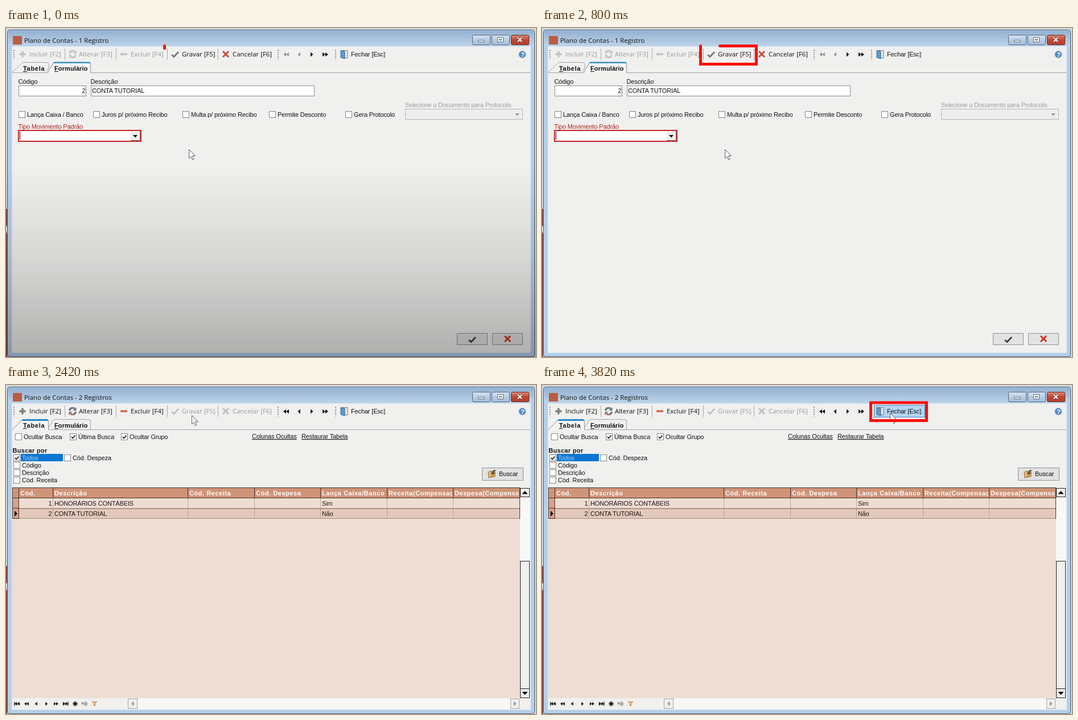
An HTML page for the animation above (4090 ms loop, 931 by 578 pixels).

```html
<!DOCTYPE html>
<html lang="pt">
<head>
<meta charset="utf-8">
<title>Plano de Contas</title>
<style>
  html, body { margin: 0; width: 100%; height: 100%; overflow: hidden; background: #d3d9df; }
  svg { display: block; }
  text { font: 11px "Liberation Sans", Arial, sans-serif; letter-spacing: -.14px; fill: currentColor; white-space: pre; }
  .ui text, text.ui { font: 11.4px "Open Sans", "Noto Sans", sans-serif; letter-spacing: 0; }
  .b { font-weight: bold; letter-spacing: .1px; }
  .head text { font-weight: bold; letter-spacing: .55px; fill: #fff; }
  .end { text-anchor: end; }
  .u { text-decoration: underline; }
  .off { color: #9b9b9b; }
  .on { color: #111; }
  .field { fill: #fff; stroke: #8b8b8b; }
  .btn { fill: #e2e2e2; stroke: #929292; }
  .line { fill: none; stroke: currentColor; }

  /* one loop lasts 4090 ms */
  .form, .table, .fade, .cursor, .draw, .fieldHover, .saveHover, .savePress, .closeHover {
    animation: 4090ms linear infinite;
  }
  .form { animation-name: form; }
  .table { animation-name: table; }
  .fade { animation-name: fade; }
  .cursor { animation-name: cursor; }
  .draw { fill: none; stroke: #fc0f0b; stroke-width: 5; stroke-linecap: round; stroke-dasharray: 261 400; }
  .box1 { animation-name: box1; }
  .box2 { animation-name: box2; }
  .fieldHover { animation-name: fieldHover; }
  .saveHover { animation-name: saveHover; }
  .savePress { animation-name: savePress; }
  .closeHover { animation-name: closeHover; }

  @keyframes form {
    0%, 55.74% { visibility: visible; }
    55.75%, 100% { visibility: hidden; }
  }
  @keyframes table {
    0%, 55.74% { visibility: hidden; }
    55.75%, 100% { visibility: visible; }
  }
  @keyframes fade {
    0%, 1.4% { opacity: 1; }
    6.2%, 100% { opacity: 0; }
  }
  @keyframes box1 {
    0% { stroke-dashoffset: 257; }
    22.69%, 100% { stroke-dashoffset: 0; }
  }
  @keyframes box2 {
    0%, 63.1% { stroke-dashoffset: 261; visibility: hidden; }
    63.11% { stroke-dashoffset: 261; visibility: visible; }
    86.14%, 100% { stroke-dashoffset: 0; visibility: visible; }
  }
  @keyframes fieldHover {
    0%, 29.82% { opacity: 0; }
    29.83%, 36.66% { opacity: 1; }
    36.67%, 100% { opacity: 0; }
  }
  @keyframes saveHover {
    0%, 43.51% { opacity: 0; }
    43.52%, 100% { opacity: 1; }
  }
  @keyframes savePress {
    0%, 46.93% { opacity: 0; }
    46.94%, 100% { opacity: 1; }
  }
  @keyframes closeHover {
    0%, 91.68% { opacity: 0; }
    91.69%, 100% { opacity: 1; }
  }
  @keyframes cursor {
    0%, 23.23% { transform: translate(321px, 213px); }
    26.41% { transform: translate(321px, 180px); }
    33.25% { transform: translate(318px, 90px); }
    40.1% { transform: translate(322px, 64px); }
    44%, 55.74% { transform: translate(325px, 53px); }
    55.75%, 62.6% { transform: translate(326px, 53px); }
    76.04% { transform: translate(492px, 114px); }
    79.71% { transform: translate(507px, 111px); }
    89.98% { transform: translate(605px, 54px); }
    91.69%, 100% { transform: translate(611px, 49px); }
  }
</style>
</head>
<body>
<svg width="931" height="578" viewBox="0 0 931 578">
  <defs>
    <linearGradient id="title" x2="0" y2="1">
      <stop stop-color="#94b1d0"/><stop offset="1" stop-color="#bfd5ec"/>
    </linearGradient>
    <linearGradient id="glass" x2="0" y2="1">
      <stop stop-color="#d5e2f0"/><stop offset=".5" stop-color="#b8cde4"/><stop offset="1" stop-color="#a6bfdb"/>
    </linearGradient>
    <linearGradient id="red" x2="0" y2="1">
      <stop stop-color="#dc8a78"/><stop offset=".5" stop-color="#bd4630"/><stop offset="1" stop-color="#b5402c"/>
    </linearGradient>
    <linearGradient id="shade" gradientUnits="userSpaceOnUse" x2="0" y1="240" y2="578">
      <stop stop-opacity="0"/><stop offset=".47" stop-opacity=".1"/><stop offset="1" stop-opacity=".27"/>
    </linearGradient>

    <path id="plus" d="M0-5.5V5.5M-5.5 0H5.5" stroke="currentColor" stroke-width="3.4"/>
    <path id="minus" d="M-6 0H6" stroke="currentColor" stroke-width="3.6"/>
    <path id="check" d="M-6 1L-2 4.5L6-4" class="line" stroke-width="2.8"/>
    <path id="cross" d="M-5-5L5 5M5-5L-5 5" stroke="currentColor" stroke-width="3"/>
    <g id="cycle">
      <path d="M-5.5-1A5.5 5.5 0 0 1 4-4M5.5 1A5.5 5.5 0 0 1-4 4" class="line" stroke-width="3"/>
      <path d="M6.5-7V-1H1zM-6.5 7V1H-1z" fill="currentColor"/>
    </g>
    <path id="tri" d="M-2-4L2.5 0L-2 4z" fill="currentColor"/>
    <path id="tri2" d="M-5-3.7L0 0L-5 3.7zM0-3.7L5 0L0 3.7z" fill="currentColor"/>
    <path id="down" d="M-4-2H4L0 2.5z" fill="currentColor"/>
    <g id="last"><use href="#tri2"/><path d="M5-4V4" stroke="currentColor" stroke-width="1.5"/></g>
    <rect id="cb" x=".5" y=".5" width="11" height="11" fill="#fff" stroke="#858585"/>
    <g id="cbOn"><use href="#cb"/><path d="M3 6L5 8.5L9.5 3.5" fill="none" stroke="#111" stroke-width="1.7"/></g>
    <path id="grip" d="M0 0V17" stroke="#8e8e8e" stroke-width="2" stroke-dasharray="2 2"/>
    <g id="door">
      <path d="M-2.500-6.500H6V6.500H-2.500z" fill="#eee8d8" stroke="#6d7c8a"/>
      <path d="M-6-6.500L1-5V8L-6 6z" fill="#5b9cd2" stroke="#37668f"/>
    </g>
    <g id="closeItem">
      <use href="#door" x="594" y="46"/>
      <text x="606" y="50">Fechar [Esc]</text>
    </g>
  </defs>

  <!-- window frame -->
  <path d="M0 318H2V578H0z" fill="#8b4b3d"/>
  <path d="M0 346L2 350V362L0 357z" fill="#e9e1de"/>
  <rect x="2.500" y="3.500" width="926" height="574" rx="4" fill="#b6cfe9" stroke="#435a70"/>
  <rect x="4" y="5" width="923" height="28" fill="url(#title)"/>
  <rect x="10" y="32" width="912" height="539" fill="#d9e7f3"/>
  <rect x="11" y="33" width="910" height="537" fill="#f0f0ef"/>
  <rect x="12" y="14" width="16" height="15" rx="1" fill="#b95d43"/>
  <g stroke="#55687c">
    <rect x="819.5" y="12.500" width="31" height="17" rx="2" fill="url(#glass)"/>
    <rect x="853.5" y="12.500" width="31" height="17" rx="2" fill="url(#glass)"/>
    <rect x="887.5" y="12.500" width="31" height="17" rx="2" fill="url(#red)" stroke="#612c28"/>
    <path d="M829.500 21.500H840.500V24.500H829.500zM863.500 16.500H873.500V24.500H863.500zM866.500 19.500H870.500V21.500H866.500z" fill="#fff"/>
  </g>
  <path d="M899 17L906 24M906 17L899 24" stroke="#703b35" stroke-width="4"/>
  <path d="M899 17L906 24M906 17L899 24" stroke="#fff" stroke-width="2.200"/>

  <!-- shared toolbar parts -->
  <path d="M103.500 36V56M193.500 36V56M283.500 36V56M372.500 36V56" stroke="#a9a9a9"/>
  <use href="#grip" x="14" y="38"/><use href="#grip" x="478" y="38"/><use href="#grip" x="579" y="38"/>
  <g class="on ui"><use href="#closeItem"/></g>
  <circle cx="907" cy="46.500" r="6" fill="#4d8dc6" stroke="#8babc8"/>
  <text x="904.300" y="50.500" class="b" fill="#fff" style="fill:#fff">?</text>
  <g class="on"><use href="#tri" x="537" y="46.500"/><use href="#tri2" x="561" y="46.500"/></g>
  <path d="M11 78.500H921" stroke="#a4a4a4"/>

  <!-- form page -->
  <g class="form">
    <text class="ui on" x="32" y="26">Plano de Contas - 1 Registro</text>
    <g class="off ui">
      <g color="#c3c3c3"><use href="#plus" x="29" y="46"/><use href="#cycle" x="117" y="46"/><use href="#minus" x="207" y="46"/></g>
      <text x="41" y="50">Incluir [F2]</text>
      <text x="128" y="50">Alterar [F3]</text>
      <text x="219" y="50">Excluir [F4]</text>
    </g>
    <g class="off"><use href="#tri2" transform="translate(492 46.500) scale(-1 1)"/><use href="#tri" transform="translate(515 46.500) scale(-1 1)"/></g>
    <g class="on ui">
      <use href="#check" x="297" y="46" color="#6b7d78"/>
      <text x="309" y="50">Gravar [F5]</text>
      <use href="#cross" x="386" y="46" color="#c94b3a"/>
      <text x="398" y="50">Cancelar [F6]</text>
    </g>
    <g class="saveHover ui on">
      <rect x="285.500" y="35.500" width="85" height="21" fill="#b5d5f3" stroke="#3d7fb9"/>
      <use href="#check" x="297" y="46" color="#31465a"/>
      <text x="309" y="50">Gravar [F5]</text>
    </g>
    <g class="savePress ui" color="#bdd0e1">
      <rect x="285.500" y="35.500" width="85" height="21" fill="#75b1e3" stroke="#2d6ca8"/>
      <use href="#check" x="297" y="46" color="#26394b"/>
      <text x="309" y="50">Gravar [F5]</text>
    </g>

    <path d="M11 78L27 62.500Q29 60.500 32 60.500H72Q75 61 75 64V70L71 78" fill="#f0f0ef" stroke="#a4a4a4"/>
    <path d="M73 79L82 63Q84 60.500 87 60.500H146Q148.500 61 148.500 64V79" fill="#f4f4f3" stroke="#8e9499"/>
    <path d="M82 62L85 59.500H147L149 62z" fill="#3c91c0"/>
    <text x="30" y="75" class="b on" style="letter-spacing:.7px"><tspan class="u">T</tspan>abela</text>
    <text x="85" y="75" class="b on"><tspan class="u">F</tspan>ormulário</text>

    <g class="on">
      <text x="21.500" y="98">Código</text>
      <text x="148.500" y="98">Descrição</text>
      <rect class="field" x="22.500" y="101.500" width="118" height="18"/>
      <rect class="field" x="149.500" y="101.500" width="392" height="18"/>
      <rect class="fieldHover" x="149.500" y="101.500" width="392" height="18" fill="none" stroke="#2c77b8"/>
      <text class="end" x="139.500" y="114">2</text>
      <text x="151" y="114">CONTA TUTORIAL</text>
      <use href="#cb" x="22" y="146"/><text x="37" y="156">Lança Caixa / Banco</text>
      <use href="#cb" x="153" y="146"/><text x="168" y="156">Juros p/ próximo Recibo</text>
      <use href="#cb" x="310" y="146"/><text x="325" y="156">Multa p/ próximo Recibo</text>
      <use href="#cb" x="462" y="146"/><text x="477" y="156">Permite Desconto</text>
      <use href="#cb" x="596" y="146"/><text x="611" y="156">Gera Protocolo</text>
    </g>
    <g class="off">
      <text x="700.500" y="139">Selecione o Documento para Protocolo</text>
      <rect x="701.500" y="142.500" width="206" height="18" fill="#eee" stroke="#b4b4b4"/>
      <use href="#down" x="898" y="152"/>
    </g>
    <text x="21.500" y="177" color="#b3201d">Tipo Movimento Padrão</text>
    <rect x="22" y="180" width="215" height="19" fill="#fff" stroke="#c52320" stroke-width="2"/>
    <rect x="219" y="182" width="16" height="15" fill="#ececec"/>
    <path d="M219 197.500H235.500V182" fill="none" stroke="#777"/>
    <use href="#down" class="on" x="227" y="190"/>
    <path d="M24.500 182V196" stroke="#111"/>

    <rect class="btn" x="792.500" y="536.500" width="53" height="20"/>
    <rect class="btn" x="854.500" y="536.500" width="53" height="20"/>
    <use href="#check" x="819" y="547" color="#34454b"/>
    <use href="#cross" x="881" y="546" color="#d0301c"/>
  </g>

  <!-- table page -->
  <g class="table">
    <text class="ui on" x="32" y="26">Plano de Contas - 2 Registros</text>
    <g class="on ui">
      <use href="#plus" x="29" y="46" color="#788071"/><text x="41" y="50">Incluir [F2]</text>
      <use href="#cycle" x="117" y="46" color="#68747c"/><text x="128" y="50">Alterar [F3]</text>
      <use href="#minus" x="207" y="46" color="#d76b49"/><text x="219" y="50">Excluir [F4]</text>
    </g>
    <path d="M119 51A5.500 5.500 0 0 1 112 48" fill="none" stroke="#d17a58" stroke-width="2.500"/>
    <g class="on"><use href="#tri2" transform="translate(492 46.500) scale(-1 1)"/><use href="#tri" transform="translate(515 46.500) scale(-1 1)"/></g>
    <g class="off ui">
      <g color="#c1c1c1"><use href="#check" x="297" y="46"/><use href="#cross" x="386" y="46"/></g>
      <text x="309" y="50">Gravar [F5]</text>
      <text x="398" y="50">Cancelar [F6]</text>
    </g>
    <g class="closeHover ui on">
      <rect x="583.500" y="35.500" width="89" height="21" fill="#b4d5f3" stroke="#4287bd"/>
      <use href="#closeItem"/>
    </g>

    <path d="M73 78L82 63Q84 60.500 87 60.500H146Q148.500 61 148.500 64V78" fill="#f0f0ef" stroke="#a4a4a4"/>
    <path d="M11 79L27 62.500Q29 60.500 32 60.500H72Q74.500 61 74.500 64V79" fill="#f4f4f3" stroke="#8e9499"/>
    <path d="M26 63L30 60H73L75 63z" fill="#2487c9"/>
    <text x="30" y="75" class="b on" style="letter-spacing:.7px"><tspan class="u">T</tspan>abela</text>
    <text x="85" y="75" class="b on"><tspan class="u">F</tspan>ormulário</text>

    <g class="on">
      <use href="#cb" x="16" y="85"/><text x="31" y="95">Ocultar Busca</text>
      <use href="#cbOn" x="112" y="85"/><text x="127" y="95">Última Busca</text>
      <use href="#cbOn" x="202" y="85"/><text x="217" y="95">Ocultar Grupo</text>
      <text class="u" x="432" y="94">Colunas Ocultas</text>
      <text class="u" x="519" y="94">Restaurar Tabela</text>
      <text class="b" x="11.500" y="119" style="letter-spacing:.3px">Buscar por</text>
      <rect x="26" y="121" width="74" height="13" fill="#0b75d3"/>
      <use href="#cbOn" x="13" y="122"/><text x="28" y="132" color="#a8cdf0">Todos</text>
      <use href="#cb" x="102" y="122"/><text x="117" y="132">Cód. Despeza</text>
      <use href="#cb" x="13" y="135"/><text x="28" y="145">Código</text>
      <use href="#cb" x="13" y="148"/><text x="28" y="158">Descrição</text>
      <use href="#cb" x="13" y="161"/><text x="28" y="171">Cód. Receita</text>
      <rect class="btn" x="836.500" y="145.500" width="72" height="22"/>
      <path d="M847 153L852 151L859 153V161L848 163z" fill="#edb563" stroke="#8d6b47"/>
      <path d="M857 149L851 156H855L851 162L860 154H856L861 150z" fill="#595047"/>
      <text x="866" y="160">Buscar</text>
    </g>

    <!-- grid -->
    <rect x="11" y="180" width="892" height="370" fill="#eeddd3"/>
    <rect x="11" y="181" width="891" height="17" fill="#cf9478"/>
    <rect x="11" y="198" width="11" height="37" fill="#d5a18a"/>
    <rect x="23" y="217" width="879" height="18" fill="#e3c9bc"/>
    <path d="M82.500 199V234M319.500 199V234M436.500 199V234M552.500 199V234M669.500 199V234M785.500 199V234M23 216.500H902" stroke="#c3a292"/>
    <path d="M11 180.500H903M11 198.500H902M11.500 180V235M22.500 181V235M11 216.500H22M11 234.500H22M82.500 181V198M319.500 181V198M436.500 181V198M552.500 181V198M669.500 181V198M785.500 181V198M902.500 181V235" stroke="#49352d"/>
    <path d="M23 217.500H902M23 234.500H902" stroke="#5c4a42" stroke-dasharray="1 1"/>
    <path d="M15 221L20 226L15 231z"/>
    <g class="head">
      <text x="25" y="194">Cód.</text>
      <text x="85" y="194">Descrição</text>
      <text x="322" y="194">Cód. Receita</text>
      <text x="439" y="194">Cód. Despesa</text>
      <text x="555" y="194">Lança Caixa/Banco</text>
      <svg x="670" width="114" height="200"><text x="2" y="194">Receita(Compensação)</text></svg>
      <svg x="786" width="114" height="200"><text x="2" y="194">Despesa(Compensação)</text></svg>
    </g>
    <g color="#1c1614">
      <text class="end" x="80.500" y="212">1</text><text x="85" y="212">HONORÁRIOS CONTÁBEIS</text><text x="555" y="212">Sim</text>
      <text class="end" x="80.500" y="230">2</text><text x="85" y="230">CONTA TUTORIAL</text><text x="555" y="230">Não</text>
    </g>

    <!-- scroll bars and navigator -->
    <rect x="903" y="181" width="17" height="369" fill="#f8f8f7"/>
    <g fill="#f0f0ef" stroke="#222">
      <rect x="903.500" y="181.500" width="16" height="15"/>
      <rect x="903.500" y="309.500" width="16" height="224"/>
      <rect x="903.500" y="533.500" width="16" height="16"/>
    </g>
    <path d="M906.500 191.500H916.500L911.500 186zM906.500 539H916.500L911.500 544.500z"/>
    <rect x="11" y="550" width="910" height="20" fill="#f0f0ef"/>
    <rect x="231" y="551" width="655" height="18" fill="#f7f7f6"/>
    <g fill="#eee" stroke="#a5a5a5">
      <rect x="214.500" y="551.500" width="16" height="17"/>
      <rect x="886.500" y="551.500" width="15" height="17"/>
    </g>
    <path d="M224.500 556V564L220 560zM892 556V564L896.500 560z" fill="#929292"/>
    <g class="on">
      <use href="#last" transform="translate(19.500 560) scale(-.9 .9)"/>
      <use href="#tri2" transform="translate(36 560) scale(-.8)"/>
      <use href="#tri" transform="translate(53 560) scale(-.85)"/>
      <use href="#tri" transform="translate(71 560) scale(.85)"/>
      <use href="#tri2" transform="translate(88 560) scale(.8)"/>
      <use href="#last" transform="translate(104.500 560) scale(.9)"/>
      <path id="star" d="M121.500 555.500V564.500M117 560H126M118.500 557L124.500 563M124.500 557L118.500 563" class="line" stroke-width="1.300"/>
      <use href="#star" x="18" color="#a3a3a3"/>
      <path d="M133 556V562L136 559z" fill="#8a8a8a"/>
      <path d="M151.500 556.500H159.500L156.500 560V563.500H154.500V560z" fill="#f4c18b" stroke="#d17a2d"/>
    </g>
  </g>

  <rect class="fade" width="931" height="578" fill="url(#shade)"/>
  <path class="cursor" d="M.5.500V16L4 12.500L6.700 18.500L9 17.500L6.500 11.500H11.500z" fill="#fff" stroke="#5c5c63"/>
  <g class="form"><path class="draw box1" d="M278.500 31.500V63.500H376.500V31.500H278.500"/></g>
  <g class="table"><path class="draw box2" d="M577.500 31V62.500H675.500V31H577.500"/></g>
</svg>
</body>
</html>
```
